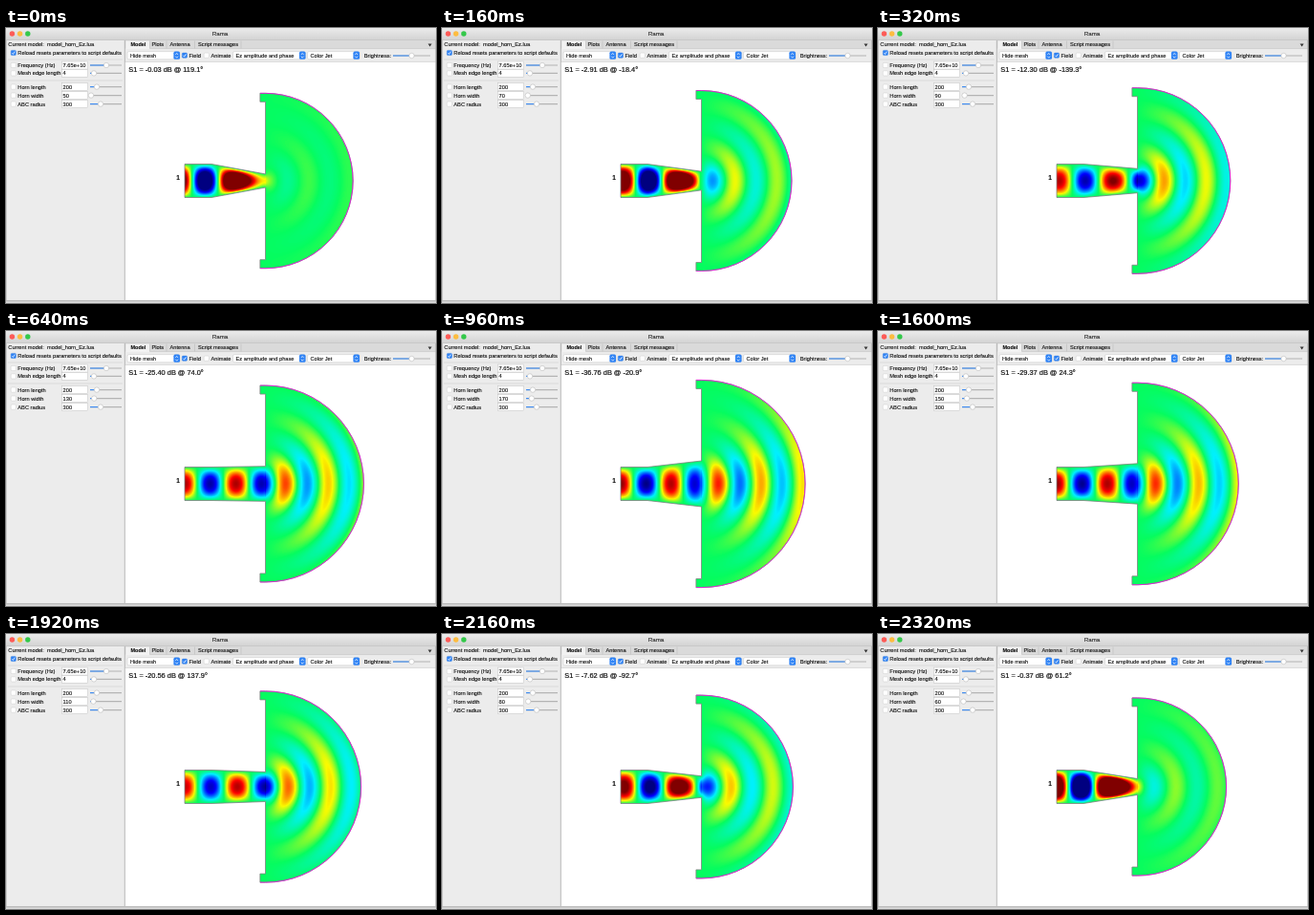
Write an HTML page with a canvas that moves like this. It is 450 px wide and 288 px high and loops after 2400 ms.

```html
<!DOCTYPE html>
<html lang="en">
<head>
<meta charset="utf-8">
<title>Horn width sweep</title>
<style>
html, body { margin: 0; width: 100%; height: 100%; overflow: hidden; background: #fff; }
canvas, svg { position: absolute; left: 0; top: 0; }
text { font: 5.7px "Liberation Sans", Arial, sans-serif; fill: #111; stroke: #111; stroke-width: .12px; white-space: pre; }
</style>
</head>
<body>
<canvas id="field" width="450" height="288"></canvas>
<svg id="ui" width="450" height="288" viewBox="0 0 450 288">
  <defs>
    <linearGradient id="bar" x2="0" y2="1"><stop stop-color="#ebebeb"/><stop offset="1" stop-color="#d2d2d2"/></linearGradient>
    <linearGradient id="shade" x2="0" y2="1"><stop stop-color="#b4b4b4"/><stop offset="1" stop-color="#e4e4e4"/></linearGradient>
  </defs>
  <path id="outline" fill="none" stroke="#808080" stroke-width=".8"/>
  <path id="arc" fill="none" stroke="#e020d8" stroke-width=".9"/>
</svg>
<script>
const ui = document.getElementById('ui');
const canvas = document.getElementById('field');
const ctx = canvas.getContext('2d');

// ---- window chrome and controls ----
function add(tag, attrs, text) {
  const el = document.createElementNS('http://www.w3.org/2000/svg', tag);
  for (const key in attrs) el.setAttribute(key, attrs[key]);
  if (text) el.textContent = text;
  return ui.appendChild(el);
}
const rect = (x, y, width, height, fill, more) => add('rect', { x, y, width, height, fill, ...more });
const label = (x, y, text, style = '') => add('text', { x, y, style }, text);
const line = (d, stroke, width = .8) => add('path', { d, stroke, fill: 'none', 'stroke-width': width });

function check(x, y, on) {
  rect(x, y, 5.2, 5.2, on ? '#2f83f5' : '#fff', { rx: 1, stroke: on ? '#2a74dc' : '#c2c2c2', 'stroke-width': .4 });
  if (on) line(`M${x + 1.2},${y + 2.7}l1.1,1.3l1.7,-2.8`, '#fff');
}
function slider(x0, x1, y, knob) {
  line(`M${x0},${y}H${x1}`, '#b4b4b4', 1.1);
  const done = line(`M${x0},${y}H${knob}`, '#3b8cf5', 1.1);
  const dot = add('circle', { cx: knob, cy: y, r: 2.7, fill: '#fff', stroke: '#b0b0b0', 'stroke-width': .5 });
  return x => {
    done.setAttribute('d', `M${x0},${y}H${x}`);
    dot.setAttribute('cx', x);
  };
}
function select(x, w, text) {
  rect(x, 24.6, w, 8.2, '#fff', { rx: 1.6, stroke: '#c4c4c4', 'stroke-width': .5 });
  rect(x + w - 6.6, 24.6, 6.6, 8.2, '#2f83f5', { rx: 1.6 });
  const m = x + w - 3.3;
  line(`M${m - 1.4},28l1.4,-1.6l1.4,1.6M${m - 1.4},29.6l1.4,1.6l1.4,-1.6`, '#fff', .7);
  label(x + 3, 30.8, text);
}
function param(y, name, value, knob) {
  check(5.2, y - 2.6, false);
  label(12.3, y + 2, name);
  rect(58.3, y - 4, 27.4, 8, '#fff', { stroke: '#c0c0c0', 'stroke-width': .5 });
  return { text: label(59.6, y + 2, value), slide: slider(88, 121, y, knob) };
}

rect(0, 0, 450, 13, 'url(#bar)');
line('M0,12.8H450', '#b4b4b4', .5);
['#fc5b57', '#fdbc40', '#34c84a'].forEach((fill, i) => add('circle', { cx: 6.4 + 8.2 * i, cy: 6, r: 2.7, fill }));
label(224, 8.4, 'Rama', 'font-size:6.2px;text-anchor:middle;fill:#333');

rect(0, 13, 124, 273, '#ececec');
rect(124, 13, 326, 22.5, '#ececec');
rect(124, 13, 326, 8.5, '#dadada');
rect(125.5, 13.6, 25, 8.4, '#f2f2f2');
line('M124.3,13V286', '#a8a8a8');
line('M150.5,13.5V21.5M168,13.5V21.5M197.5,13.5V21.5M246,13.5V21.5', '#bcbcbc', .6);
line('M150.5,21.6H450M124,35.4H450', '#bdbdbd', .5);
line('M449.6,13V286M.3,13V286', '#b0b0b0', .7);
rect(0, 285, 450, 3, 'url(#shade)');

label(130.5, 19.3, 'Model', 'font-weight:bold;font-size:5.5px');
label(152.5, 19.3, 'Plots');
label(171.5, 19.3, 'Antenna');
label(201, 19.3, 'Script messages');
add('path', { d: 'M441.6,16.5h4l-2,3z', fill: '#333' });

select(127, 55, 'Hide mesh');
check(184.3, 26.1, true);
label(191.5, 30.8, 'Field');
check(207.2, 26.1, false);
label(214.5, 30.8, 'Animate');
select(237.5, 76, 'Ez amplitude and phase');
select(315.5, 54.5, 'Color Jet');
label(374.8, 30.8, 'Brightness:');
slider(405, 444, 29, 424.5);

label(2.3, 18.8, 'Current model:  model_horn_Ez.lua');
check(5.2, 23.4, true);
label(12.3, 28, 'Reload resets parameters to script defaults');
line('M2,33H122M2,55H122', '#c6c6c6', .5);
param(39, 'Frequency (Hz)', '7.65e+10', 105);
param(47.4, 'Mesh edge length', '4', 92);
param(61.6, 'Horn length', '200', 95);
const horn = param(70.6, 'Horn width', '50', 89);
param(79.6, 'ABC radius', '300', 99);

const result = label(128.3, 46.2, '', 'font-size:7.4px;stroke-width:.2px');
label(178.3, 158.6, '1', 'font-size:6.6px;font-weight:bold');

// ---- wave field ----
const SCALE = .282, LEFT = 187, MID = 160, LEN = 84, WALL = LEFT + LEN, FEED = 28, GUIDE = 35;
const K = 2 * Math.PI / 43;
const COLS = 116, ROWS = 150;

// Half-space radiation kernel, by distance from the wall and vertical offset
const kerRe = new Float32Array(COLS * ROWS), kerIm = new Float32Array(COLS * ROWS);
for (let i = 0; i < COLS; i++) for (let j = 0; j < ROWS; j++) {
  const x = i + .5, r = Math.hypot(x, j), z = K * r, q = 2 / (Math.PI * z);
  const mag = K / 2 * Math.sqrt(q * Math.sqrt(1 + q * q)) * x / r;
  const phase = Math.PI / 4 - z - 1 / (4 / Math.PI + 8 * z / 3);
  kerRe[i * ROWS + j] = mag * Math.cos(phase);
  kerIm[i * ROWS + j] = mag * Math.sin(phase);
}

const STOPS = [[-1, 0, 0, 128], [-.7, 0, 0, 255], [-.3, 0, 240, 255], [0, 5, 252, 95],
               [.3, 250, 250, 0], [.7, 255, 0, 0], [1, 128, 0, 0]];
const jet = Array.from({ length: 401 }, (_, n) => {
  const v = n / 200 - 1;
  const i = Math.max(1, STOPS.findIndex(s => s[0] >= v));
  const a = STOPS[i - 1], b = STOPS[i], f = (v - a[0]) / (b[0] - a[0]);
  return [1, 2, 3].map(c => a[c] + (b[c] - a[c]) * f);
});

const img = ctx.createImageData(450, 288);
function plot(x, y, v) {
  const c = jet[Math.round(200 + 200 * Math.max(-1, Math.min(1, v)))];
  img.data.set([c[0], c[1], c[2], 255], (y * 450 + x) * 4);
}

const height = (x, mouth) => x < FEED ? GUIDE : GUIDE + (mouth - GUIDE) * (x - FEED) / (LEN - FEED);

// Guided mode along the horn, solved from mouth to port for a unit incident wave
function guideMode(mouth) {
  const re = [], im = [];
  re[LEN] = 1; im[LEN] = 0;
  re[LEN - 1] = Math.cos(K); im[LEN - 1] = Math.sin(K);
  for (let x = LEN - 1; x > 0; x--) {
    const c = 2 - K * K + (Math.PI / height(x, mouth)) ** 2;
    re[x - 1] = c * re[x] - re[x + 1];
    im[x - 1] = c * im[x] - im[x + 1];
  }
  // Incident part a + jb at x = 1, then p + jq = 1 / (incident part at the port)
  const beta = Math.sqrt(K * K - (Math.PI / GUIDE) ** 2);
  const a = re[1] - (im[2] - im[0]) / 2 / beta, b = im[1] + (re[2] - re[0]) / 2 / beta;
  const n = (a * a + b * b) / 2, cs = Math.cos(beta), sn = Math.sin(beta);
  const p = (a * cs - b * sn) / n, q = -(a * sn + b * cs) / n;
  return re.map((r, x) => {
    const g = Math.sqrt(GUIDE / height(x, mouth));
    return [g * (r * p - im[x] * q), g * (r * q + im[x] * p)];
  });
}

function drawField(mouth, radius) {
  const mode = guideMode(mouth);
  const top = Math.floor(MID - radius) - 1, bottom = 2 * MID - top;
  for (let x = 0; x < LEN; x++) {
    const h = height(x + .5, mouth), e = (mode[x][0] + mode[x + 1][0]) / 2;
    for (let y = top; y < bottom; y++) {
      const d = y + .5 - MID;
      plot(LEFT + x, y, Math.abs(d) < h / 2 ? e * Math.cos(Math.PI * d / h) : 0);
    }
  }
  const [cr, ci] = mode[LEN], src = [];
  for (let y = Math.ceil(MID - mouth / 2 - .5); y + .5 < MID + mouth / 2; y++)
    src.push([y, Math.cos(Math.PI * (y + .5 - MID) / mouth)]);
  for (let i = 0; i < Math.min(COLS, radius + 2); i++) for (let y = top; y < MID; y++) {
    let sr = 0, si = 0;
    for (const [sy, w] of src) {
      const k = i * ROWS + Math.abs(y - sy);
      sr += w * kerRe[k];
      si += w * kerIm[k];
    }
    const v = cr * sr - ci * si;
    plot(WALL + i, y, v);
    plot(WALL + i, 2 * MID - 1 - y, v);
  }
  ctx.putImageData(img, 0, 0);
}

// ---- sweep: horn width 50 to 200 and back ----
const DB = [-.03, -.37, -2.91, -7.62, -12.3, -16.83, -20.56, -23.21, -25.4, -27.38, -29.37, -32.54, -36.76, -40.12, -41.87, -39.75];
const DEG = [119.1, 61.2, -18.4, -92.7, -139.3, 176.3, 137.9, 104.2, 74, 47.9, 24.3, 1.6, -20.9, -43.5, -71.2, -104.6];
const outline = document.getElementById('outline'), arc = document.getElementById('arc');

function show(n) {
  const width = 50 + 10 * n, mouth = width * SCALE, h = mouth / 2, R = 300 * SCALE + h;
  const wall = WALL + .5, lip = wall - 5.6, g = GUIDE / 2, t = MID - R, b = MID + R;
  const rim = `H${wall}A${R},${R} 0 0 1 ${wall},${b}H${lip}`;
  const d = `M${LEFT},${MID - g}H${LEFT + FEED}L${wall},${MID - h}V${t + 9}H${lip}V${t}${rim}` +
    `V${b - 9}H${wall}V${MID + h}L${LEFT + FEED},${MID + g}H${LEFT}Z`;
  outline.setAttribute('d', d);
  arc.setAttribute('d', `M${lip},${t}${rim}`);
  canvas.style.clipPath = `path("${d}")`;
  drawField(mouth, R);
  result.textContent = `S1 = ${DB[n].toFixed(2)} dB @ ${DEG[n].toFixed(1)}°`;
  horn.text.textContent = width;
  horn.slide(87 + .04 * width);
}

let shown = -1;
function tick() {
  const step = Math.floor(performance.now() % 2400 / 80);
  const n = Math.min(step, 30 - step);
  if (n !== shown) show(shown = n);
  requestAnimationFrame(tick);
}
tick();
</script>
</body>
</html>
```
